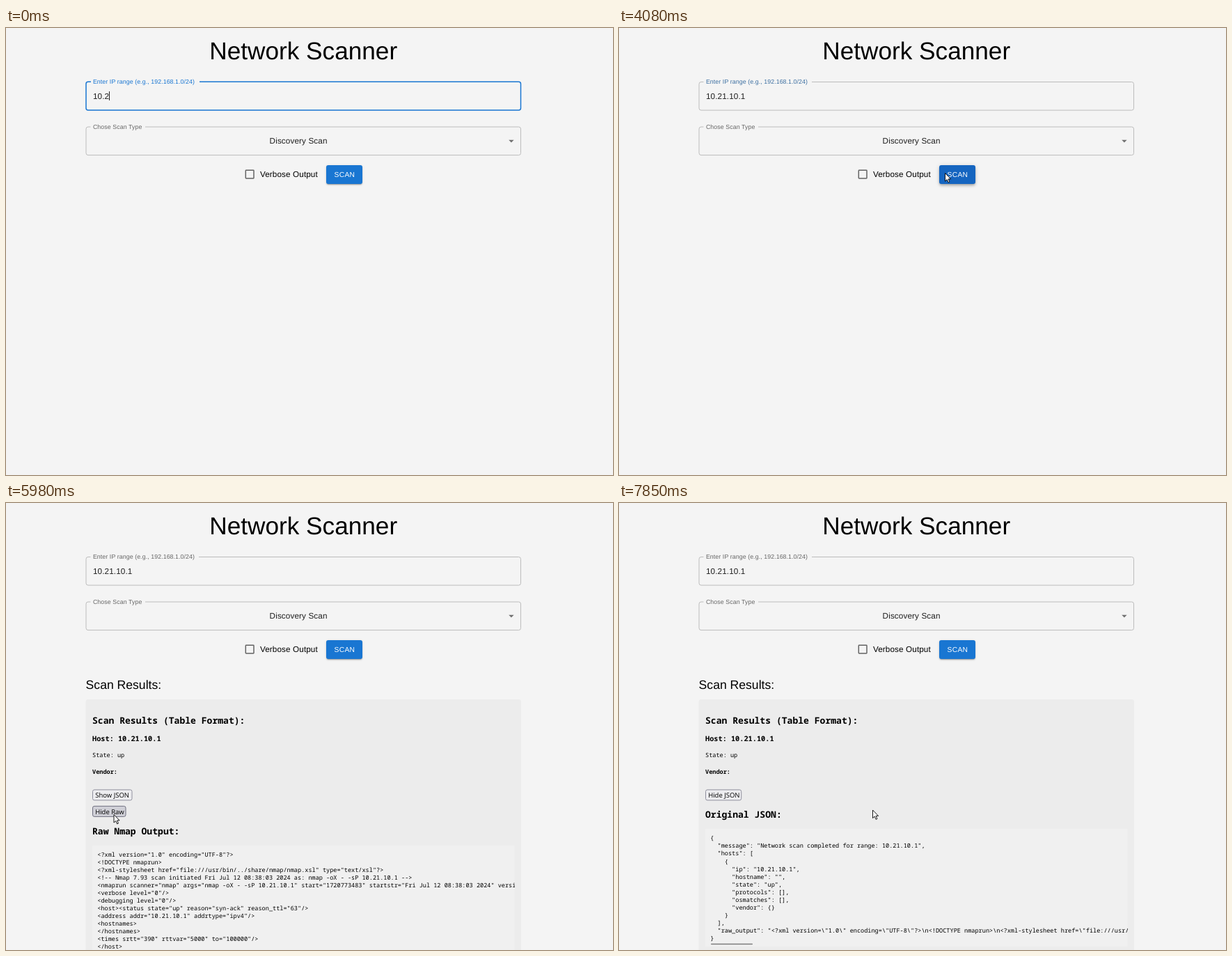
Write an HTML page that moves like this. It is 872 by 642 pixels and loops after 8 s.

```html
<!DOCTYPE html>
<html lang="en">
<head>
<meta charset="utf-8">
<title>Network Scanner</title>
<style>
  html, body { margin: 0; width: 100%; height: 100%; overflow: hidden; background: #f4f4f4; }
  svg { position: absolute; left: 0; top: 0; }
  text { font-family: "Liberation Sans", Arial, sans-serif; white-space: pre; text-rendering: geometricPrecision; }
  .body { font-size: 11.733px; letter-spacing: .11px; }
  .label { font-size: 8.8px; letter-spacing: .0825px; fill: #666; }
  .mono { font-family: "Noto Sans Mono", "DejaVu Sans Mono", monospace; font-size: 8.575px; }
  .bold { font-weight: 700; }
  .h3 { font-size: 13.07px; }
  .h4 { font-size: 10.28px; }
  .btn text { font-family: "Open Sans", "Noto Sans", sans-serif; font-size: 9.5px; }
  #scan { position: absolute; left: 460px; top: 197px; width: 51.5px; height: 26.5px; border-radius: 3px; background: #1976d2;
    box-shadow: 0 2.2px .7px -1.5px rgba(0,0,0,.2), 0 1.5px 1.5px rgba(0,0,0,.14), 0 .7px 3.7px rgba(0,0,0,.12); }
  #scan.hover { background: #1565c0;
    box-shadow: 0 1.5px 2.9px -.7px rgba(0,0,0,.2), 0 2.9px 3.7px rgba(0,0,0,.14), 0 .7px 7.3px rgba(0,0,0,.12); }
</style>
</head>
<body>
<div id="scan"></div>
<svg width="872" height="642" viewBox="0 0 872 642">
  <defs><clipPath id="clip"><rect x="124" y="460" width="607" height="182"/></clipPath></defs>

  <text x="427.2" y="45" font-size="35.2" text-anchor="middle">Network Scanner</text>

  <path id="field" fill="none"/>
  <text id="fieldLabel" class="label" x="124.9" y="80">Enter IP range (e.g., 192.168.1.0/24)</text>
  <text id="ip" class="body" x="124.9" y="101.5" fill="#1f1f1f"></text>
  <rect id="caret" y="91" width="1" height="13" fill="#1f1f1f"/>

  <path id="select" fill="none" stroke="#bcbcbc"/>
  <text class="label" x="124.9" y="144.8">Chose Scan Type</text>
  <text class="body" x="378.6" y="166" fill="#1f1f1f">Discovery Scan</text>
  <path d="M722.2 160.7h7.4l-3.7 3.7z" fill="#6f6f6f"/>

  <rect x="344.3" y="204.2" width="11.7" height="11.7" rx=".7" fill="none" stroke="#626262" stroke-width="1.47"/>
  <text class="body" x="364.9" y="214">Verbose Output</text>
  <text x="471.6" y="214" font-size="10.27" letter-spacing=".293" fill="#fff">SCAN</text>

  <g id="results">
    <text x="114.6" y="266.5" font-size="17.6">Scan Results:</text>
    <rect id="panel" x="114.5" y="282" width="625.5" rx="3.5" fill="#ececec"/>
    <text class="mono bold h3" x="124" y="316.5">Scan Results (Table Format):</text>
    <text class="mono bold h4" x="124" y="342.3">Host: 10.21.10.1</text>
    <text class="mono" x="124" y="365.3">State: up</text>
    <text class="mono bold" x="124" y="389.3">Vendor:</text>
    <g id="jsonBtn" class="btn"><rect/><text x="128.2" y="423.2"></text></g>
    <g id="rawBtn" class="btn"><rect/><text x="128.2" y="446.7"></text></g>
    <g id="raw">
      <text class="mono bold h3" x="124" y="475.8">Raw Nmap Output:</text>
      <rect x="124" y="492" width="606.5" height="150" fill="#f0f0f0"/>
    </g>
    <g id="json">
      <text class="mono bold h3" x="124" y="452.3">Original JSON:</text>
      <rect x="124" y="468" width="606.5" height="169" fill="#f0f0f0"/>
      <rect x="132" y="632.8" width="60" height="1.4" rx=".7" fill="#7c7c7c"/>
    </g>
  </g>

  <path id="mouse" d="M0 0V11.6L2.7 9.1 4.6 13.4 6.4 12.6 4.6 8.4H8.1Z" fill="#fff" stroke="#000" stroke-width=".9"/>
</svg>
<script>
const LOOP = 8000;
const BLUR = 3990, RESULTS = 4360, RAW = 5980, JSON_OPEN = 7130;
const $ = id => document.getElementById(id);
const show = (el, on) => el.setAttribute('visibility', on ? 'inherit' : 'hidden');
const setAll = (el, attrs) => { for (const k in attrs) el.setAttribute(k, attrs[k]); };

// [time, text, caret visible]
const typing = [
  [0, '10.2', 1], [150, '10.21', 1], [300, '10.21.', 1], [590, '10.21.1', 1],
  [860, '10.21.1.', 1], [1310, '10.21.1.', 0], [1440, '10.21.1', 1],
  [1730, '10.21.10', 1], [1900, '10.21.10.', 1], [2130, '10.21.10.1', 1],
  [2980, '10.21.10.1', 0], [3400, '10.21.10.1', 1], [BLUR, '10.21.10.1', 0]
];

// [time, x, y]
const mousePath = [
  [3400, 398, 124], [3540, 425, 152], [3670, 452, 188], [3800, 466, 205], [3940, 468.5, 208.5],
  [4400, 468.5, 208.5], [4520, 453, 233], [4780, 453, 233], [4970, 408, 320], [5120, 358, 400],
  [5260, 319, 453], [5400, 268, 501], [5550, 212, 482], [5690, 172, 456], [5830, 155, 447.5],
  [6150, 155, 447.5], [6430, 166, 436], [6710, 176, 417], [6860, 169, 419], [7300, 165, 420],
  [7480, 215, 436], [7680, 325, 444], [7850, 364.5, 441]
];

const rawText = `<?xml version="1.0" encoding="UTF-8"?>
<!DOCTYPE nmaprun>
<?xml-stylesheet href="file:///usr/bin/../share/nmap/nmap.xsl" type="text/xsl"?>
<!-- Nmap 7.93 scan initiated Fri Jul 12 08:38:03 2024 as: nmap -oX - -sP 10.21.10.1 -->
<nmaprun scanner="nmap" args="nmap -oX - -sP 10.21.10.1" start="1720773483" startstr="Fri Jul 12 08:38:03 2024" version="7.93">
<verbose level="0"/>
<debugging level="0"/>
<host><status state="up" reason="syn-ack" reason_ttl="63"/>
<address addr="10.21.10.1" addrtype="ipv4"/>
<hostnames>
</hostnames>
<times srtt="390" rttvar="5000" to="100000"/>
</host>`;

const jsonText = String.raw`{
  "message": "Network scan completed for range: 10.21.10.1",
  "hosts": [
    {
      "ip": "10.21.10.1",
      "hostname": "",
      "state": "up",
      "protocols": [],
      "osmatches": [],
      "vendor": {}
    }
  ],
  "raw_output": "<?xml version=\"1.0\" encoding=\"UTF-8\"?>\n<!DOCTYPE nmaprun>\n<?xml-stylesheet href=\"file:///usr/bin/../share"
}`;

function addLines(group, text, y) {
  const box = document.createElementNS('http://www.w3.org/2000/svg', 'g');
  box.setAttribute('clip-path', 'url(#clip)');
  text.split('\n').forEach((line, i) => {
    const el = document.createElementNS('http://www.w3.org/2000/svg', 'text');
    setAll(el, { class: 'mono', x: 131.3, y: y + i * 11.04 });
    el.textContent = line;
    box.append(el);
  });
  group.append(box);
}

// Outlined field with a gap in its top edge
function outline(top, gapEnd, gapStart = 121.5) {
  const l = 115, r = 739.5, b = top + 40.6, c = 3;
  return `M${gapStart} ${top}H${l + c}Q${l} ${top} ${l} ${top + c}V${b - c}Q${l} ${b} ${l + c} ${b}` +
    `H${r - c}Q${r} ${b} ${r} ${b - c}V${top + c}Q${r} ${top} ${r - c} ${top}H${gapEnd}`;
}

function drawButton(id, y, label, width, hover) {
  const [rect, text] = $(id).children;
  setAll(rect, {
    x: 124.5, y, width, height: 15, rx: 2.5,
    fill: hover ? '#d0d0d7' : '#ededf0', stroke: hover ? '#707080' : '#8f8f9d'
  });
  if (text.textContent !== label) text.textContent = label;
}

function mouseAt(t) {
  const i = mousePath.findIndex(p => p[0] > t);
  if (i < 0) return mousePath[mousePath.length - 1].slice(1);
  const [t0, x0, y0] = mousePath[i - 1], [t1, x1, y1] = mousePath[i];
  const k = (t - t0) / (t1 - t0);
  return [x0 + (x1 - x0) * k, y0 + (y1 - y0) * k];
}

function mix(a, b, k) {
  return `rgb(${a.map((v, i) => Math.round(v + (b[i] - v) * k))})`;
}

function draw(t) {
  const [, text, caretOn] = typing.filter(s => s[0] <= t).pop();
  const focused = t < BLUR;
  if ($('ip').textContent !== text) $('ip').textContent = text;
  $('caret').setAttribute('x', Math.round(124.4 + $('ip').getComputedTextLength()));
  show($('caret'), caretOn);

  setAll($('field'), {
    d: focused ? outline(77.3, 278, 122) : outline(77.5, 277),
    stroke: focused ? '#1976d2' : '#bcbcbc',
    'stroke-width': focused ? 1.5 : 1
  });
  const fade = Math.min(1, Math.max(0, (t - BLUR) / 200));
  $('fieldLabel').style.fill = mix([25, 118, 210], [102, 102, 102], fade);

  $('scan').className = t >= 3800 && t < 4520 ? 'hover' : '';

  const rawOpen = t >= RAW, jsonOpen = t >= JSON_OPEN;
  show($('results'), t >= RESULTS);
  $('panel').setAttribute('height', rawOpen ? 380 : 179);
  drawButton('jsonBtn', 411.9, jsonOpen ? 'Hide JSON' : 'Show JSON', jsonOpen ? 51.2 : 56.5, t >= 6860 && t < 7340);
  drawButton('rawBtn', 435.4, rawOpen ? 'Hide Raw' : 'Show RAW', rawOpen ? 47.5 : 55.2, t >= 5760 && t < 6280);
  show($('rawBtn'), !jsonOpen);
  show($('raw'), rawOpen && !jsonOpen);
  show($('json'), jsonOpen);

  show($('mouse'), t >= 3400);
  if (t >= 3400) $('mouse').setAttribute('transform', `translate(${mouseAt(t)})`);
}

addLines($('raw'), rawText, 507.5);
addLines($('json'), jsonText, 484.4);
$('select').setAttribute('d', outline(142, 200));

const start = performance.now();
function tick() {
  draw((performance.now() - start) % LOOP);
  requestAnimationFrame(tick);
}
tick();
</script>
</body>
</html>
```
